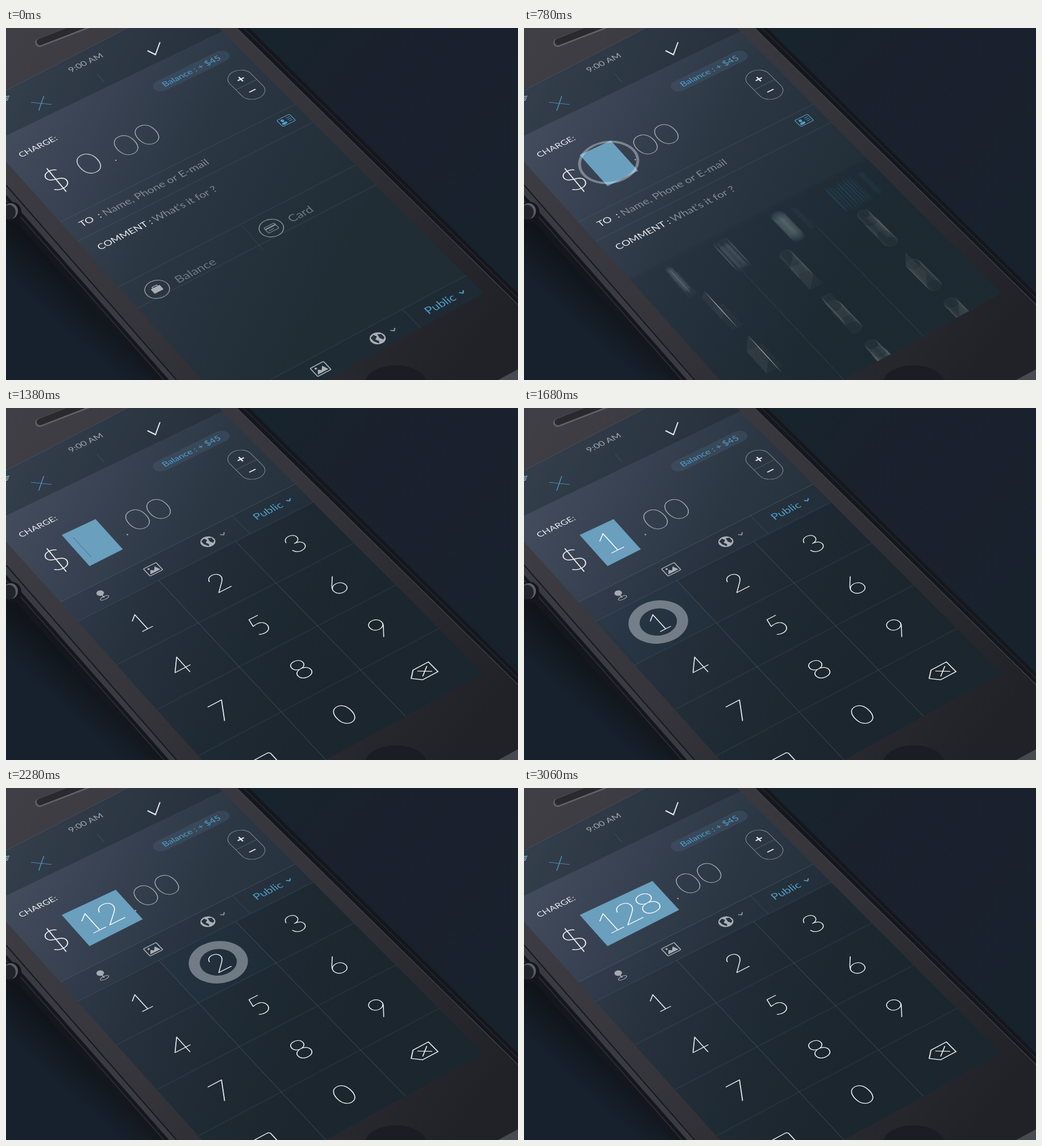
Animation of 901 by 621 pixels, one loop 3.27 s. Source, as an HTML page with a canvas:

```html
<!DOCTYPE html>
<html lang="en">
<head>
<meta charset="utf-8">
<title>Charge screen</title>
<style>
html, body { margin: 0; width: 100%; height: 100%; overflow: hidden; background: #18222d; }
canvas { display: block; }
</style>
</head>
<body>
<canvas id="stage" width="901" height="621"></canvas>
<script>
const c = document.getElementById('stage').getContext('2d');
const LOOP = 3270, COL = 320 / 3, ROW = 84, BAR = 38, TRAVEL = 341;
const BLUE = '#509fc8', WHITE = '#e8ebee', DIM = '#808993';
const SCREEN = [[0, 110], [213, 0], [375, 0], [840, 468], [563, 621], [345, 621], [0, 236]];

const clamp = x => Math.min(1, Math.max(0, x));
const lin = (t, a, b) => clamp((t - a) / (b - a));
const ease = (t, a, b) => { const x = lin(t, a, b); return x * x * (3 - 2 * x); };
const easeOut = x => 1 - (1 - clamp(x)) ** 3;
const easeInOut = x => x < .5 ? 4 * x ** 3 : 1 - 4 * (1 - x) ** 3;

// Perspective: plane units (320 wide, origin at the keypad's corner) to pixels
function P(u, v) {
  const s = u / 320, t = v / 336, w = 1 + .0277 * s - .06 * t;
  return [(131 + 420.9 * s + 261 * t) / w, (374 - 201.3 * s + 280.2 * t) / w];
}

// Draw in plane units around a pixel, using the local slope of the perspective
function at([x, y], draw) {
  const q = .9306 + 2.35e-5 * x + 1.773e-4 * y, a = q / 320, b = q / 336;
  c.save();
  c.transform(a * (420.9 - .0277 * x), a * (-201.3 - .0277 * y),
              b * (261 + .06 * x), b * (280.2 + .06 * y), x, y);
  draw();
  c.restore();
}

function trace(pts) {
  c.beginPath();
  pts.forEach(p => c.lineTo(...p));
}
function poly(fill, ...pts) {
  trace(pts);
  c.fillStyle = fill;
  c.fill();
}
function line(color, width, ...pts) {
  trace(pts);
  c.strokeStyle = color;
  c.lineWidth = width;
  c.stroke();
}
function disc(x, y, rx, ry, fill) {
  c.beginPath();
  c.ellipse(x, y, rx, ry, 0, 0, 7);
  c.fillStyle = fill;
  c.fill();
}
function pill(w, h, r, fill, stroke, width = 1) {
  c.beginPath();
  c.roundRect(-w / 2, -h / 2, w, h, r);
  if (fill) { c.fillStyle = fill; c.fill(); }
  if (stroke) { c.strokeStyle = stroke; c.lineWidth = width; c.stroke(); }
}
function gradient(x0, y0, x1, y1, ...colors) {
  const g = c.createLinearGradient(x0, y0, x1, y1);
  colors.forEach((k, i) => g.addColorStop(i / (colors.length - 1), k));
  return g;
}
// A thin face gets an outline that sets the stroke weight
function glyphs(str, x, y, size, color, outline = 0) {
  c.font = `${outline ? 100 : 400} ${size}px Lato, "Open Sans", sans-serif`;
  c.textAlign = 'center';
  c.fillStyle = c.strokeStyle = color;
  c.fillText(str, x, y + size * .36);
  if (outline) {
    c.lineWidth = outline;
    c.strokeText(str, x, y + size * .36);
  }
}
const label = (str, pos, size, color) => at(pos, () => glyphs(str, 0, 0, size, color));

const bezel = gradient(0, 0, 800, 600, '#403f46', '#35353b', '#212228');
const glass = gradient(0, 130, 600, 420, '#444e5e', '#384252', '#2c3744', '#25313b', '#212d35');
const keyShade = gradient(150, 400, 540, 430, 'rgba(20,30,39,.22)', 'rgba(20,30,39,.46)');

function phone() {
  poly(gradient(450, 0, 850, 330, '#17242d', '#1b202d', '#18222d'), [0, 0], [901, 0], [901, 621], [0, 621]);
  poly(gradient(95, 525, 150, 465, '#16212d', '#101318'), [0, 300], [290, 621], [0, 621]);
  poly('#14171d', [0, 0], [428, 0], [901, 468], [901, 621], [262, 621], [0, 322]);
  line('#2b2c33', 2, [0, 304], [278, 621]);
  poly('#3a3a42', [0, 278], [301, 621], [287, 621], [0, 294]);
  poly('#494a51', [901, 598], [901, 621], [860, 621]);
  poly(bezel, [0, 0], [406, 0], [901, 488], [901, 602], [866, 621], [299, 621], [0, 278]);
  line('#45454c', 1.2, [406, 0], [901, 488]);
  line('#24252b', 2, [418, 0], [901, 477]);
  line('#17181e', 2, [0, 277], [300, 621]);
  disc(686, 627, 54, 32, '#1c1c24');
  c.lineCap = 'round';
  line('#626167', 15, [59, 26], [150, -9]);
  line('#29292e', 12, [60, 24.5], [150, -10.5]);
  c.lineCap = 'butt';
  disc(11, 325, 16, 18, '#15161c');
  disc(8, 323, 13, 14, '#5a5d66');
  disc(5, 325, 12, 13, '#22242b');
}

function chevron(color) {
  line(color, 1.5, [-3, -1.5], [0, 1.5], [3, -1.5]);
}

function header() {
  poly('rgba(24,34,44,.36)', [0, 110], [213, 0], [392, 0], [0, 190]);
  line('rgba(150,160,172,.35)', 1, [0, 110], [213, 0]);
  label('9:00 AM', [140, 61], 12.3, '#a0a7b0');
  at([1, 126], () => {
    c.strokeStyle = '#a9c4d4';
    c.lineWidth = 1.3;
    for (const r of [2, 5, 8]) {
      c.beginPath();
      c.arc(0, 3, r, -2.3, -.8);
      c.stroke();
    }
  });
  at([62, 133], () => {
    line(BLUE, .9, [-9, -9], [9, 9]);
    line(BLUE, .9, [-9, 9], [9, -9]);
  });
  line(WHITE, 2, [249, 40], [263, 47], [271, 25]);
  line('rgba(150,165,180,.25)', 1, [160, 81], [173, 96]);
  at([326, 76], () => pill(106, 20, 10, 'rgba(78,108,134,.26)'));
  label('Balance : + $45', [326, 76], 12.1, BLUE);
  at([423, 100], () => {
    pill(30, 56, 15, null, '#808993', .8);
    line('#5c6772', .7, [-15, 0], [15, 0]);
    line(WHITE, 1.8, [-4.5, -12], [4.5, -12]);
    line(WHITE, 1.8, [0, -16.5], [0, -7.5]);
    line(WHITE, 1.8, [-4.5, 13], [4.5, 13]);
  });
}

function form() {
  const rule = 'rgba(140,158,176,.17)';
  [-BAR, 0, 88, 128].forEach(v => line(rule, 1, P(-5, v), P(325, v)));
  at([493, 163], () => {
    pill(18, 13, 1.5, null, BLUE, .9);
    disc(-4, -2, 2, 2.4, BLUE);
    disc(-4, 3, 3.6, 2, BLUE);
    [-3, 0, 3].forEach(y => line(BLUE, .8, [2, y], [7, y]));
  });
  label('TO  :', [148, 338], 13, WHITE);
  label('Name, Phone or E-mail', [263, 281], 14.3, DIM);
  label('COMMENT :', [209, 364], 12.6, WHITE);
  label("What's it for ?", [314, 310], 14, DIM);
  line(rule, 1, [417, 350], [452, 391]);
  const ring = () => {
    c.beginPath();
    c.arc(0, 0, 14, 0, 7);
    c.strokeStyle = '#929aa2';
    c.lineWidth = 1;
    c.stroke();
  };
  at([266, 461], () => {
    ring();
    pill(12, 8.5, 1, '#a7adb3');
    line('#a7adb3', 1, [-3, -4], [-3, -6], [3, -6], [3, -4]);
  });
  at([467, 353], () => {
    ring();
    pill(14, 10, 1, null, '#8c959d', .8);
    line('#8c959d', 2, [-7, -2], [7, -2]);
    line('#8c959d', .8, [-5, 2], [2, 2]);
  });
  label('Balance', [333, 428], 15.3, '#6d7882');
  label('Card', [518, 328], 15.3, '#6d7882');
}

function amount(t) {
  label('CHARGE:', [56, 209], 12, WHITE);
  const w = 47 * ease(t, 600, 820) + 28 * ease(t, 2150, 2250) + 26 * ease(t, 2680, 2772);
  const cents = 70 + 16 * ease(t, 720, 1000) + 18 * ease(t, 2210, 2330) + 27 * ease(t, 2760, 2880);
  const digit = (str, x, alpha, color = '#f4f8fa', outline = .6) => at([98, 224], () => {
    c.globalAlpha = alpha;
    if (alpha) glyphs(str, x, 31, 49, color, outline);
  });
  digit('$', -27, 1, WHITE, .8);
  digit('0', 18.5, 1 - lin(t, 600, 690), '#c3c9ce');
  poly('#6a9fbe', [98, 224], [98 + 1.268 * w, 224 - .594 * w], [147 + 1.248 * w, 279 - .634 * w], [147, 279]);
  if (t > 1080 && t < 1600) {
    c.globalAlpha = .5 - .5 * Math.cos((t - 1080) / 400 * 2 * Math.PI);
    line('#1d3d52', 1, [118, 228], [150, 263]);
    c.globalAlpha = 1;
  }
  digit('1', 22, ease(t, 1610, 1680));
  digit('2', 48, ease(t, 2210, 2270));
  digit('8', 75, ease(t, 2770, 2850));
  digit('0', cents, 1, '#a9b1b8', .4);
  digit('0', cents + 29, 1, '#a9b1b8', .4);
  at([98, 224], () => disc(cents - 23, 46, .9, .9, '#c3c9ce'));
}

const keyCentre = n => [(((n - 1) % 3) + .5) * COL + .5, (Math.floor((n - 1) / 3) + .5) * ROW + 1.5];
const slab = (fill, v0, v1) => poly(fill, P(-12, v0), P(332, v0), P(332, v1), P(-12, v1));

function panelBack(k) {
  slab(glass, k - BAR, k + 345);
  slab('rgba(20,30,40,.12)', k - BAR, k);
  slab(keyShade, k, k + 345);
}

function panelItems(k) {
  const put = (u, v, draw) => at(P(u, v + k), draw);
  const rule = (u0, v0, u1, v1, a) => line(`rgba(140,158,176,${a})`, 1, P(u0, v0 + k), P(u1, v1 + k));
  for (const v of [-BAR, 0, ROW, 2 * ROW, 3 * ROW]) rule(-5, v, 325, v, .17);
  for (const u of [COL, 2 * COL]) rule(u, 0, u, 340, .32);
  rule(234, -BAR, 234, 0, .22);

  put(41, -19, () => {
    line('#a4abb1', 1.2, [0, -4], [0, 5]);
    disc(0, -4, 4.4, 4.4, '#a4abb1');
    c.beginPath();
    c.ellipse(0, 5.5, 5.5, 2.5, 0, 0, 7);
    c.lineWidth = .9;
    c.stroke();
  });
  put(111, -19, () => {
    pill(17.5, 14.5, 1, null, '#a9b0b6', 1.2);
    poly('#a9b0b6', [-7, 5], [-3, -1], [0, 2], [4, -3], [7, 5]);
    disc(-4, -3.5, 1.4, 1.4, '#a9b0b6');
  });
  put(187, -19, () => {
    disc(0, 0, 8.8, 8.8, '#a9b0b6');
    poly('#27333e', [-6, -5], [-1, -7], [1, -3], [-3, 0], [-1, 4], [-3, 7], [-6, 1]);
    poly('#27333e', [3, -5], [7, -3], [7, 3], [4, 5], [2, 1]);
  });
  put(208, -19, () => chevron('#87919a'));
  put(272, -20, () => glyphs('Public', 0, 0, 14.6, BLUE));
  put(302, -20, () => chevron(BLUE));

  const key = (str, n) => put(...keyCentre(n), () => glyphs(str, 0, 0, 40, WHITE, .6));
  for (let n = 1; n <= 9; n++) key(n, n);
  key('0', 11);
  put(COL / 2 - 1, 307, () => pill(22, 28, 3, null, WHITE, 1.2));
  put(...keyCentre(12), () => {
    line(WHITE, 1.2, [-16, 0], [-7, -9], [14, -9], [14, 9], [-7, 9], [-16, 0], [-7, -9]);
    line(WHITE, 1.1, [-4, -5], [9, 5]);
    line(WHITE, 1.1, [-4, 5], [9, -5]);
  });
}

const slide = t => TRAVEL * (1 - easeInOut(lin(t, 590, 940)));

// While sliding, many faint copies over a short shutter time give motion blur
function panel(t) {
  const moving = t > 582 && t < 948, n = moving ? 24 : 1;
  const offsets = Array.from({length: n}, (_, i) => slide(moving ? t + 16 * (i / (n - 1) - .5) : t));
  c.globalAlpha = moving ? .16 : 1;
  offsets.forEach(panelBack);
  c.globalAlpha = 1;
  taps.forEach(([start, n]) => n && highlight(t - start, n));
  c.globalAlpha = 1 / n;
  offsets.forEach(panelItems);
  c.globalAlpha = 1;
}

// Start time and key number; 0 is the amount field
const taps = [[540, 0], [1530, 1], [2130, 2], [2670, 8]];

function highlight(age, n) {
  const a = lin(age, 0, 60) * (1 - lin(age, 80, 162));
  if (!a) return;
  const u = (n - 1) % 3 * COL, v = Math.floor((n - 1) / 3) * ROW;
  poly(`rgba(36,78,112,${.68 * a})`, P(u, v), P(u + COL, v), P(u + COL, v + ROW), P(u, v + ROW));
}

function touch(age, n) {
  if (age <= 0 || age > 330) return;
  at(n ? P(...keyCentre(n)) : [149, 237], () => {
    c.beginPath();
    c.arc(0, 0, 36 * easeOut(age / 240), 0, 7);
    c.arc(0, 0, 33 * easeOut((age - 95) / 190), 0, 7);
    c.fillStyle = `rgba(225,230,235,${.41 * (1 - lin(age, 240, 330))})`;
    c.fill('evenodd');
  });
}

function render(t) {
  phone();
  c.save();
  trace(SCREEN);
  c.clip();
  poly(glass, ...SCREEN);
  header();
  form();
  amount(t);
  panel(t);
  taps.forEach(([start, n]) => touch(t - start, n));
  c.restore();
}

const begin = performance.now();
(function tick() {
  render((performance.now() - begin) % LOOP);
  requestAnimationFrame(tick);
})();
</script>
</body>
</html>
```
